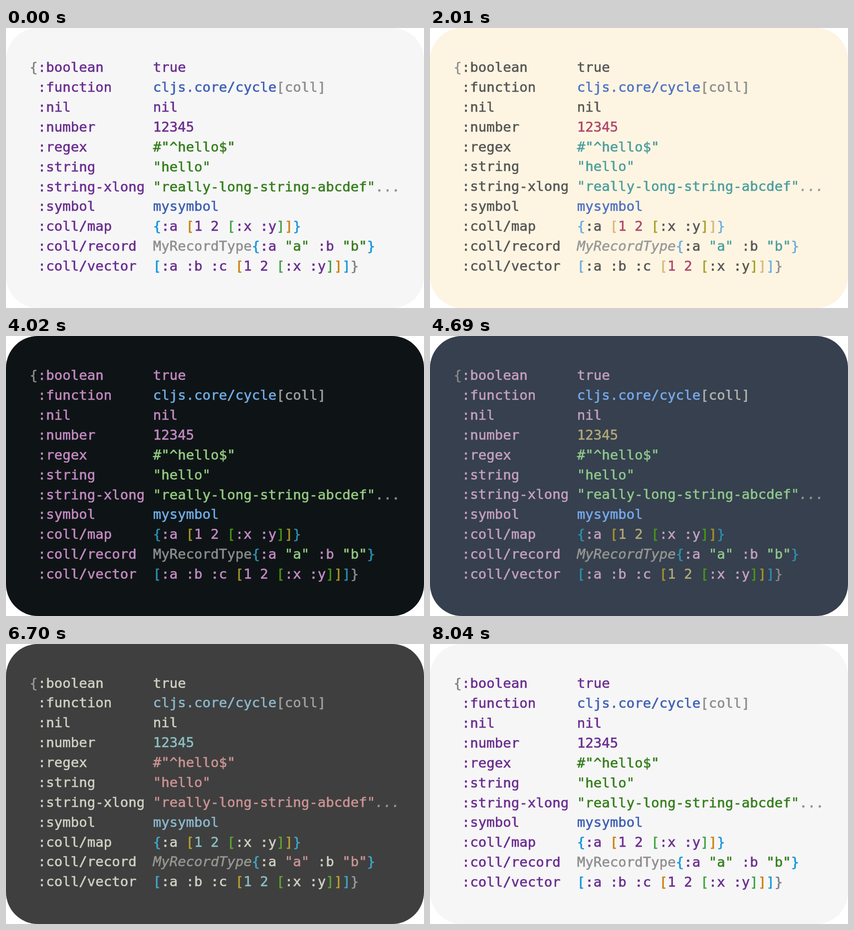
These frames come from a looping animation (838 px wide and 562 px high, 8.71 s). An HTML page with a canvas:

```html
<!DOCTYPE html>
<html lang="en">
<head>
<meta charset="utf-8">
<title>Color themes</title>
<style>
  html, body { margin: 0; width: 838px; height: 562px; overflow: hidden; background: #fff; }
  canvas { display: block; }
</style>
</head>
<body>
<canvas id="stage" width="838" height="562"></canvas>
<script>
const ctx = document.getElementById('stage').getContext('2d');
const HOLD = 670;
const FONT = '27.41px "DejaVu Sans Mono", monospace';
const LEFT = 47.3, ADVANCE = 16.5, LINE_HEIGHT = 39.875;
const EXTRA_WEIGHT = 0.6;

const LINES = [
  '{:boolean      true',
  ' :function     cljs.core/cycle[coll]',
  ' :nil          nil',
  ' :number       12345',
  ' :regex        #"^hello$"',
  ' :string       "hello"',
  ' :string-xlong "really-long-string-abcdef"...',
  ' :symbol       mysymbol',
  ' :coll/map     {:a [1 2 [:x :y]]}',
  ' :coll/record  MyRecordType{:a "a" :b "b"}',
  ' :coll/vector  [:a :b :c [1 2 [:x :y]]]}'
];

const TOKEN = /(?<string>#?"[^"]*")|(?<args>\[coll\])|(?<type>MyRecordType|\.\.\.)|(?<key>:[\w\/-]+|true|nil)|(?<number>\d+)|(?<open>[{[])|(?<close>[}\]])|(?<symbol>[a-z][\w.\/]+)/g;

function tokenize(lines) {
  const tokens = [];
  let depth = 0;
  lines.forEach((line, row) => {
    for (const match of line.matchAll(TOKEN)) {
      let role = Object.keys(match.groups).find(name => match.groups[name]);
      if (role === 'open') role = 'level' + depth++;
      else if (role === 'close') role = 'level' + --depth;
      tokens.push({ row, col: match.index, text: match[0], role });
    }
  });
  return tokens;
}

const ROLES = ['bg', 'key', 'number', 'string', 'symbol', 'args', 'type',
  'level0', 'level1', 'level2', 'level3'];

// baseline: y of the first line, rounded down per line
function theme(baseline, italic, colors) {
  const result = { baseline, italic };
  colors.split(' ').forEach((color, i) => { result[ROLES[i]] = '#' + color; });
  return result;
}

const THEMES = [
  theme(88.8, false, 'f6f6f6 6a2d90 6a2d90 357d1c 3e5fb3 8c8c8c 8f8f8f 808080 1296db cb800f 3c9f40'),
  theme(88.7, true, 'f6f6f6 8c4f86 857a2c 3c7f3a 3e68b8 8c8c8c 8f8f8f 888888 1296db cb800f 3c9f40'),
  theme(88.6, true, 'f6f6f6 7a4fc0 7a4fc0 a87c14 42823c 8c8c8c 8f8f8f 808080 1296db cb800f 3c9f40'),
  theme(88.55, true, 'fdf5e2 565656 b0466a 4c9e9e 4f73c5 8c8c8c 999999 8f8f8f 6aade0 d9b779 a0a020'),
  theme(88.4, true, 'ffffff 585858 4c7c80 a05a5a 4a7590 8c8c8c 999999 909090 1296db cb800f 48a556'),
  theme(88.2, false, 'ffffff 4d4d4d 4d4d4d 4d4d4d 4d4d4d 999999 9c9c9c 999999 1296db c98012 48a556'),
  theme(88.75, false, '0e1415 c58ac4 c58ac4 95cb82 71ade7 a0a0a0 8c8c8c 8c8c8c 2d8fb0 a69528 4a9814'),
  theme(88.7, true, '36404e c5a0c0 b0a877 8fc88c 78a9ec b3b3ad 959591 888888 2d8fb0 a59228 4a9814'),
  theme(88.4, false, '2b2b2b bfbfbf bfbfbf bfbfbf bfbfbf 8f8f8f 8c8c8c 909090 2d9fc0 bfa038 4aa82a'),
  theme(88.05, true, '2d2a2e cb99ff cb99ff e0b83a 9bc893 b0b0b0 8c8c8c bbbbbb 00d0ff e0b83c 3de02d'),
  theme(88.0, true, '3f3f3f d0d0c4 8cc0c4 cc9393 8cb8cc a0a0a0 959591 999999 40a8c8 b8a030 60a830'),
  theme(87.95, true, '002b36 8f8f8c b96878 2e94b2 5b8ad6 808080 7c7c80 8f8f8f 2e94b2 b0a02c 589f0d')
];
const ORDER = [...THEMES, THEMES[0]];
const TOKENS = tokenize(LINES);

function draw(current) {
  ctx.fillStyle = '#fff';
  ctx.fillRect(0, 0, 838, 562);
  ctx.fillStyle = current.bg;
  ctx.beginPath();
  ctx.roundRect(0, 0, 838, 562, 64);
  ctx.fill();

  ctx.lineWidth = EXTRA_WEIGHT;
  ctx.lineJoin = 'round';
  for (const { row, col, text, role } of TOKENS) {
    const x = LEFT + col * ADVANCE;
    const y = Math.floor(current.baseline + row * LINE_HEIGHT);
    ctx.font = (role === 'type' && current.italic ? 'italic ' : '') + FONT;
    ctx.fillStyle = ctx.strokeStyle = current[role];
    ctx.fillText(text, x, y);
    ctx.strokeText(text, x, y);
  }
}

function tick(now) {
  draw(ORDER[Math.floor(now / HOLD) % ORDER.length]);
  requestAnimationFrame(tick);
}
requestAnimationFrame(tick);
</script>
</body>
</html>
```
